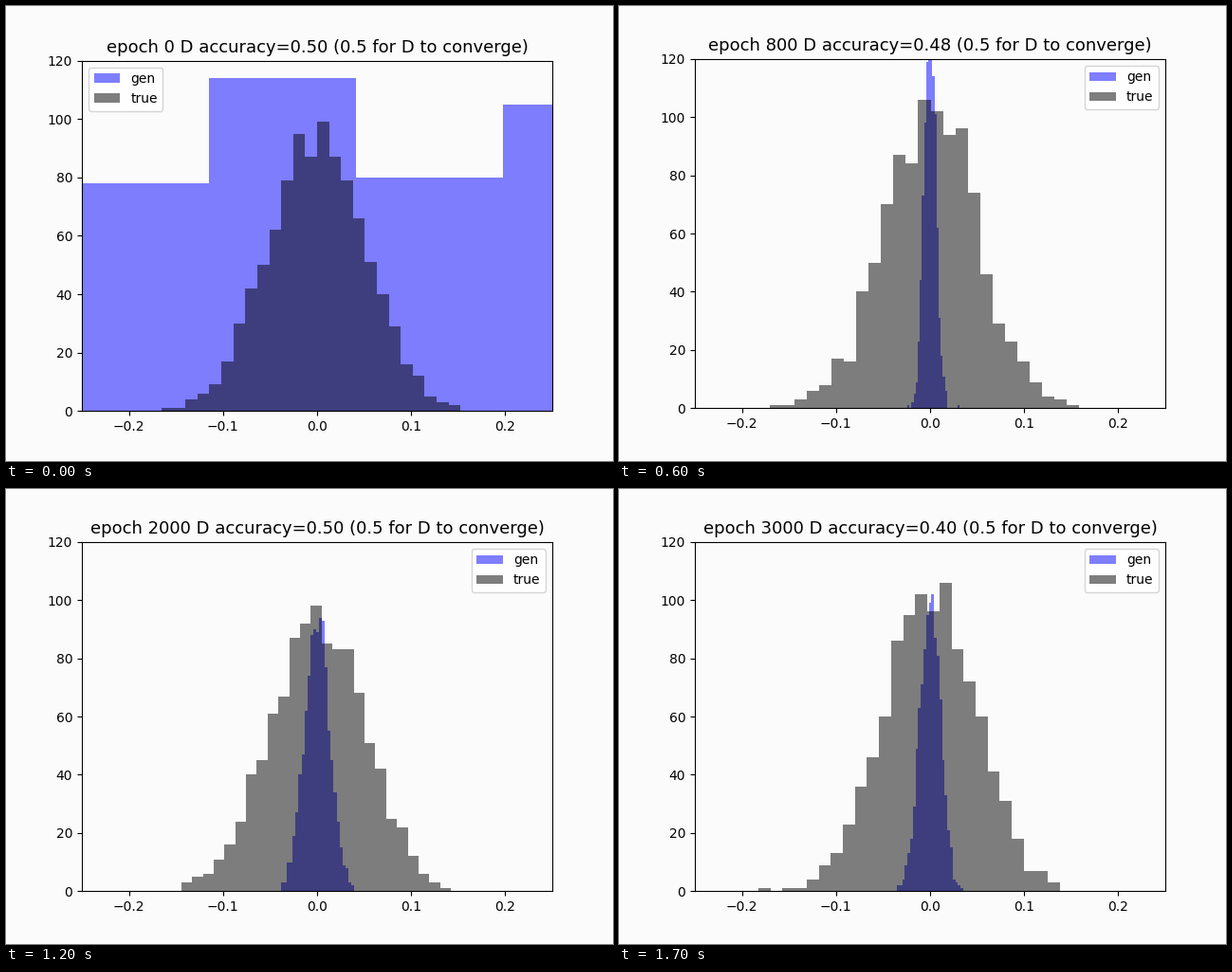
These frames come from a looping animation (640 by 480 pixels, 1800 ms). A matplotlib script:

```python
import numpy as np
import matplotlib.pyplot as plt
from matplotlib.animation import FuncAnimation

PAPER = "#fbfbfb"
W, H = 640, 480
FRAMES, INTERVAL = 18, 100
HOLD = 2            # opening frames that stay on epoch 0
SAMPLES, BINS = 1000, 25
TRUE_SD = 0.05
ROUGHNESS = 0.6     # sampling noise, as a share of the square root of a count

# Key epochs; everything between them is interpolated.
EPOCHS = [0, 200, 800, 1200, 2000, 2400, 3000]
TRACKS = {
    "accuracy": [0.50, 0.57, 0.48, 0.49, 0.50, 0.43, 0.40],
    "true_lo": [-0.1653, -0.2036, -0.1704, -0.1653, -0.1442, -0.1603, -0.1825],
    "true_hi": [0.1525, 0.1694, 0.1583, 0.1563, 0.1421, 0.1915, 0.1381],
    "gen_lo": [-0.2714, -0.0524, -0.0242, -0.0202, -0.0383, -0.0464, -0.0353],
    "gen_hi": [0.3542, 0.0547, 0.0312, 0.0252, 0.0393, 0.0494, 0.0353],
    "gen_sd": [0.2, 0.012, 0.0063, 0.0061, 0.013, 0.0135, 0.0111],
    "gen_split": [0, 0.02, 0, 0, 0, 0, 0],  # half distance of the two humps
}
UNTRAINED = np.array([78, 114, 80, 105])    # coarse, nearly flat first output

fig = plt.figure(figsize=(W / 100, H / 100), dpi=100, facecolor=PAPER)
ax = fig.add_axes([0.125, 0.11, 0.775, 0.77])


def bell(x, mean, sd):
    return np.exp(-((x - mean) / sd) ** 2 / 2) / (sd * np.sqrt(2 * np.pi))


def histogram(rng, lo, hi, sd, split=0):
    """Noisy counts of one or two merged bell curves, with their bin edges."""
    edges = np.linspace(lo, hi, BINS + 1)
    mids = (edges[:-1] + edges[1:]) / 2
    density = (bell(mids, -split, sd) + bell(mids, split, sd)) / 2
    mean = SAMPLES * (hi - lo) / BINS * density
    noise = ROUGHNESS * np.sqrt(mean) * rng.standard_normal(BINS)
    counts = np.round(np.maximum(mean + noise, 0))
    counts[[0, -1]] = np.maximum(counts[[0, -1]], 1)  # the extremes are samples
    return counts, edges


def draw_bars(counts, edges, color, label):
    ax.bar(edges[:-1], counts, np.diff(edges), align="edge",
           color=color, alpha=0.5, label=label)


def place_axes(bottom, top):
    ax.set_position([0.125, bottom / H, 0.775, (top - bottom) / H])


def update(i):
    epoch = 200 * max(0, i - HOLD)
    first = epoch == 0
    rng = np.random.default_rng(epoch)
    now = {name: np.interp(epoch, EPOCHS, keys) for name, keys in TRACKS.items()}

    true = histogram(rng, now["true_lo"], now["true_hi"], TRUE_SD)
    if first:
        edges = np.linspace(now["gen_lo"], now["gen_hi"], len(UNTRAINED) + 1)
        gen = UNTRAINED, edges
        place_axes(52.8, 422.4)
    else:
        gen = histogram(rng, now["gen_lo"], now["gen_hi"],
                        now["gen_sd"], now["gen_split"])
        place_axes(55.7, 424.2)

    ax.cla()
    ax.set_facecolor(PAPER)
    draw_bars(*gen, "blue", "gen")
    draw_bars(*true, "black", "true")
    ax.set_xlim(-0.25, 0.25)
    ax.set_ylim(0, 120)
    ax.set_xticks(np.linspace(-0.2, 0.2, 5))
    ax.set_title(f"epoch {epoch} D accuracy={now['accuracy']:.2f} "
                 "(0.5 for D to converge)", fontsize=13)
    ax.legend(loc="upper left" if first else "upper right")
    return []


anim = FuncAnimation(fig, update, frames=FRAMES, interval=INTERVAL,
                     init_func=lambda: [], repeat=True, repeat_delay=0)
plt.show()
```
